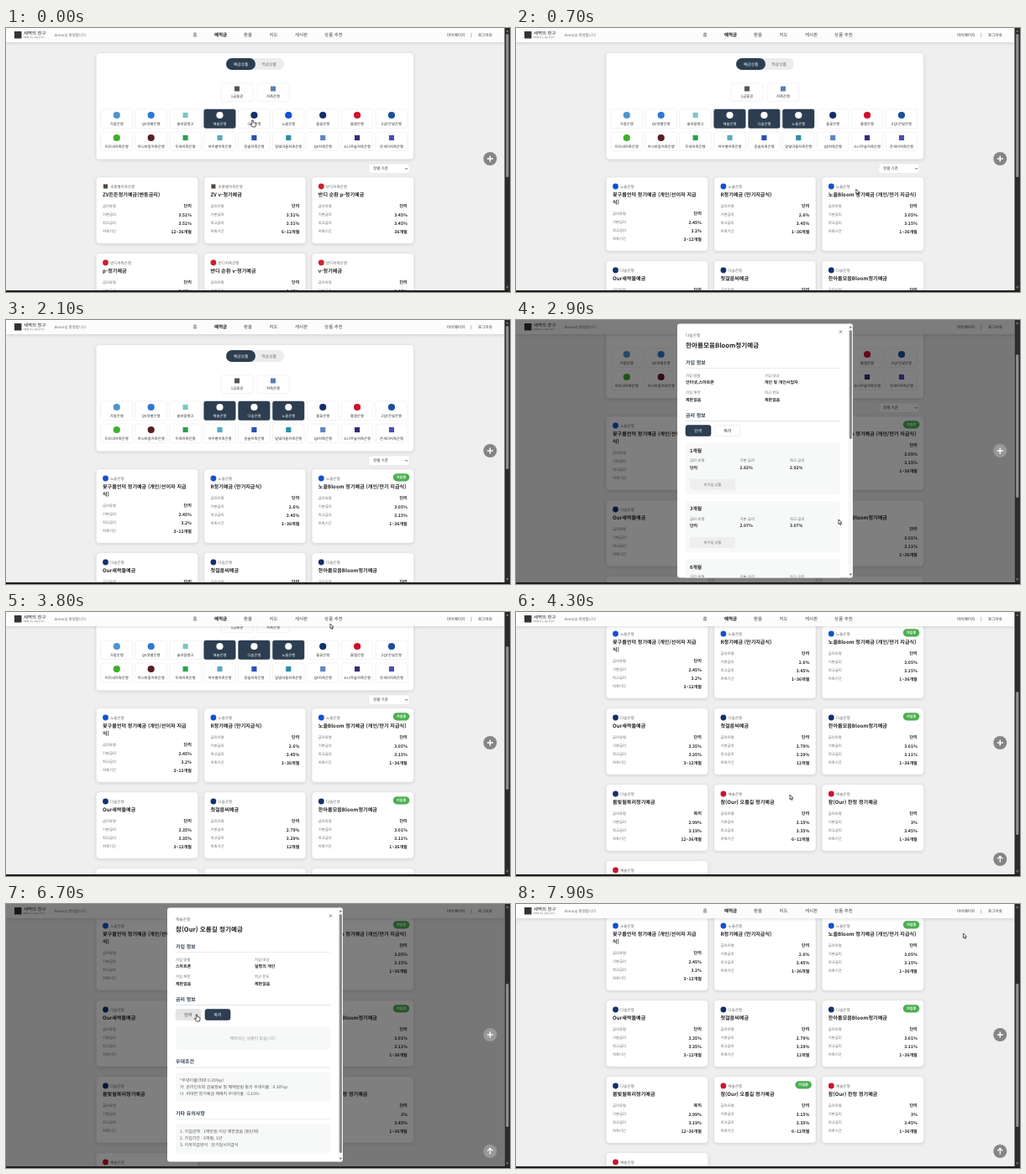
Recreate the animation shown at these times as an HTML page with a canvas. Size 600 px wide and 315 px high, loop 8 s.

```html
<!DOCTYPE html>
<html lang="ko">
<head>
<meta charset="utf-8">
<style>
html, body { margin: 0; width: 600px; height: 315px; overflow: hidden; background: #efefef; }
canvas { display: block; width: 600px; height: 315px; }
</style>
</head>
<body>
<canvas id="stage"></canvas>
<script>
const LOOP = 8000, VIEW_W = 593.5, VIEW_H = 313;
const NAVY = '#2c3e50', INK = '#222', MUTED = '#666', GREEN = '#4caf50';
const FONT = '"Noto Sans CJK KR", "Noto Sans KR", "Noto Sans CJK JP", "Noto Sans", sans-serif';
const canvas = document.getElementById('stage');
const ctx = canvas.getContext('2d');
const dpr = window.devicePixelRatio || 1;
canvas.width = 600 * dpr;
canvas.height = 315 * dpr;

// name, logo colour, wide logo (drawn as a small square)
const BANKS = [
  ['가람은행', '#4f94cd'], ['QV샛별은행', '#2b78d4'], ['솔바람뱅크', '#7fc4c4', 1],
  ['해솔은행', '#c8152d'], ['다솜은행', '#12316b'], ['노을은행', '#1450d2'],
  ['들꽃은행', '#12306b'], ['물결은행', '#d0112b'], ['ZQT은빛은행', '#1d4f9e'],
  ['미리내저축은행', '#3fae29'], ['하늬바람저축은행', '#5a1f22'], ['두레저축은행', '#2f9e4f', 1],
  ['여우별저축은행', '#5aa9c0', 1], ['윤슬저축은행', '#2a50b8', 1], ['달빛마을저축은행', '#2a8fa8', 1],
  ['QX저축은행', '#5c86c4', 1], ['소나무숲저축은행', '#3a2a78', 1], ['온새미저축은행', '#4a4fb0', 1],
  ['초롱별저축은행', '#55463c', 1], ['반디저축은행', '#d0202e'],
];
const HAESOL = 3, DASOM = 4, NOEUL = 5, CHORONG = 18, BANDI = 19;

const card = (bank, title, base, max, term, type = '단리') => ({ bank, title, values: [type, base, max, term] });
const ALL_CARDS = [
  card(CHORONG, 'ZV든든정기예금(변동금리)', '3.51%', '3.51%', '12~36개월'),
  card(CHORONG, 'ZV v-정기예금', '3.51%', '3.51%', '6~12개월'),
  card(BANDI, '반디 순환 p-정기예금', '3.45%', '3.45%', '36개월'),
  card(BANDI, 'p-정기예금', '3.45%', '3.45%', '12~36개월'),
  card(BANDI, '반디 순환 v-정기예금', '3.45%', '3.45%', '36개월'),
  card(BANDI, 'v-정기예금', '3.45%', '3.45%', '12~36개월'),
];
const BLOOM = card(NOEUL, '노을Bloom 정기예금 (개인/만기 지급식)', '3.05%', '3.15%', '1~36개월');
const MOUM = card(DASOM, '한아름모음Bloom정기예금', '3.01%', '3.11%', '1~36개월');
const OREUM = card(HAESOL, '참(Our) 오름길 정기예금', '3.15%', '3.35%', '6~12개월');
const MY_CARDS = [
  card(NOEUL, '꽃구름언덕 정기예금 (개인/선이자 지급\n식)', '2.45%', '3.2%', '3~12개월'),
  card(NOEUL, 'R정기예금 (만기지급식)', '2.6%', '3.45%', '1~36개월'),
  BLOOM,
  card(DASOM, 'Our새싹들예금', '3.35%', '3.35%', '3~12개월'),
  card(DASOM, '첫걸음씨예금', '2.79%', '3.29%', '12개월'),
  MOUM,
  card(DASOM, '봄빛월복리정기예금', '2.99%', '3.19%', '12~36개월', '복리'),
  OREUM,
  card(HAESOL, '참(Our) 한정 정기예금', '3%', '3.45%', '1~36개월'),
  card(HAESOL, '솔잎모아 정기예금', '2.9%', '3.1%', '1~36개월'),
];

const MODALS = [
  { card: BLOOM, open: 850, joined: 1700, close: 1950, thumb: 118,
    info: ['영업점,인터넷,스마트폰', '제한없음'],
    rates: [['1개월', '2.4%', '2.5%'], ['3개월', '2.5%', '2.6%'], ['6개월', '2.6%', '2.7%']] },
  { card: MOUM, open: 2550, joined: 3500, close: 3750, thumb: 130,
    info: ['인터넷,스마트폰', '개인 및 개인사업자'],
    rates: [['1개월', '2.82%', '2.92%'], ['3개월', '2.97%', '3.07%'], ['6개월', '3.01%', '3.11%']] },
  { card: OREUM, open: 5250, joined: 7200, close: 7450, thumb: 213,
    info: ['스마트폰', '실명의 개인'], compound: [6300, 6800],
    rates: [['6개월', '2.95%', '3.15%'], ['12개월', '3.15%', '3.35%']],
    notes: [
      ['우대조건', '*우대이율(최대 0.20%p)', '가. 온라인조회 금융정보 및 혜택알림 동의 우대이율 : 0.10%p', '나. 비대면 정기예금 재예치 우대이율 : 0.10%'],
      ['기타 유의사항', '1. 가입금액 : 1백만원 이상 제한없음 (원단위)', '2. 가입기간 : 6개월, 1년', '3. 이자지급방식 : 만기일시지급식'],
    ] },
];

// time, x, y, hand cursor from here on
const POINTER = [
  [0, 293.5, 110, 1], [100, 293.5, 110, 1], [380, 334, 110, 1], [520, 334, 112, 0], [780, 425, 215, 0],
  [900, 425, 215, 0], [1250, 239, 195, 1], [1700, 239, 195, 0], [1900, 386, 14, 0], [2060, 386, -15, 0],
  [2200, 400, -15, 0], [2400, 425, 240, 0], [2600, 425, 240, 0], [2900, 384, 238, 0], [3250, 236, 196, 1],
  [3500, 236, 196, 0], [3700, 386, 14, 0], [3800, 386, 14, 0], [4250, 326, 218, 0], [4400, 326, 218, 0],
  [5000, 300, 240, 0], [5850, 300, 240, 0], [6200, 252, 132, 1], [6380, 252, 132, 1], [6650, 227, 132, 1],
  [6800, 227, 132, 1], [7050, 236, 196, 1], [7220, 236, 196, 0], [7400, 386, 14, 0], [7480, 386, 14, 0],
  [7880, 532.5, 35, 0], [LOOP, 532.5, 35, 0],
];
const SCROLL = [[0, 0], [2200, 0], [2450, 63], [3850, 63], [4150, 163], [LOOP, 163]];

function track(keys, t) {
  const i = Math.max(1, keys.findIndex(k => k[0] > t));
  const a = keys[i - 1], b = keys[i];
  const u = (t - a[0]) / (b[0] - a[0]), e = u * u * (3 - 2 * u);
  return a.map((v, j) => v + (b[j] - v) * e).concat(a[3]);
}

function text(str, x, y, size, color = INK, weight = 400, align = 'left') {
  ctx.save();
  ctx.translate(x, y);
  ctx.scale(.1, .1);
  ctx.font = `${weight} ${size * 10}px ${FONT}`;
  ctx.textRendering = 'geometricPrecision';
  ctx.textBaseline = 'middle';
  ctx.textAlign = align;
  ctx.fillStyle = color;
  ctx.fillText(str, 0, 0);
  ctx.restore();
}

function box(x, y, w, h, r, fill, stroke, shadow) {
  ctx.save();
  ctx.beginPath();
  ctx.roundRect(x, y, w, h, r);
  if (shadow) {
    ctx.shadowColor = 'rgba(0,0,0,.14)';
    ctx.shadowBlur = 4 * dpr;
    ctx.shadowOffsetY = dpr;
  }
  ctx.fillStyle = fill;
  ctx.fill();
  ctx.shadowColor = 'transparent';
  if (stroke) { ctx.strokeStyle = stroke; ctx.lineWidth = .5; ctx.stroke(); }
  ctx.restore();
}

function disc(x, y, r, fill) {
  ctx.beginPath();
  ctx.arc(x, y, r, 0, 7);
  ctx.fillStyle = fill;
  ctx.fill();
}

function poly(points, fill, stroke, width = .6) {
  ctx.beginPath();
  points.forEach(([x, y]) => ctx.lineTo(x, y));
  if (fill) { ctx.closePath(); ctx.fillStyle = fill; ctx.fill(); }
  if (stroke) { ctx.strokeStyle = stroke; ctx.lineWidth = width; ctx.stroke(); }
}

function logo(bank, x, y, r, color = BANKS[bank][1]) {
  if (BANKS[bank][2]) box(x - r * .75, y - r * .75, r * 1.5, r * 1.5, 0, color);
  else disc(x, y, r, color);
}

function drawFilters(selected) {
  box(107.5, 30, 377.5, 126.5, 4, '#fff', null, true);
  box(262, 36, 69, 14, 7, '#ececec');
  box(262, 36, 35, 14, 7, NAVY);
  text('예금상품', 279.5, 43, 4.8, '#fff', 500, 'center');
  text('적금상품', 313, 43, 4.8, MUTED, 400, 'center');
  [['1금융권', 275, '#555'], ['저축은행', 318, '#5c7fb0']].forEach(([name, x, color]) => {
    box(x - 19, 66, 38, 21.5, 2, '#fff', '#e6e6e6');
    box(x - 3, 69.5, 6, 6, 0, color);
    text(name, x, 81.5, 4.4, '#333', 400, 'center');
  });
  BANKS.slice(0, 18).forEach(([name], i) => {
    const x = 113 + i % 9 * 40.9, y = i < 9 ? 97 : 124, on = selected.includes(i);
    box(x, y, 37.5, 22.5, 2, on ? NAVY : '#fff', on ? NAVY : '#e6e6e6');
    logo(i, x + 18.8, y + 7, 4.1, on ? '#fff' : undefined);
    text(name, x + 18.8, y + 17, 4.35, on ? '#fff' : '#333', 500, 'center');
  });
  box(432, 162, 48, 11.5, 2, '#fff', '#ddd');
  text('정렬 기준', 437, 167.7, 4.5, '#333');
  poly([[475.2, 167], [476.7, 168.5], [478.2, 167]], null, INK, .7);
}

function drawCard(c, x, y, h, joined) {
  box(x, y, 121, h, 4, '#fff', '#e8e8e8', true);
  logo(c.bank, x + 11, y + 11, 3.4);
  text(BANKS[c.bank][0], x + 16.7, y + 11, 4.5, MUTED);
  const lines = c.title.split('\n');
  lines.forEach((line, i) => text(line, x + 7.5, y + 21 + i * 9, 6.1, INK, 700));
  const top = y + 34.5 + (lines.length - 1) * 9;
  ['금리유형', '기본금리', '최고금리', '저축기간'].forEach((label, i) => {
    text(label, x + 7.5, top + i * 10.1, 4.35, MUTED);
    text(c.values[i], x + 113.5, top + i * 10.1, 5.1, INK, 700, 'right');
  });
  if (joined) {
    box(x + 96.5, y + 5.2, 19.5, 9.2, 4.6, GREEN);
    text('가입중', x + 106.2, y + 9.8, 4.2, '#fff', 700, 'center');
  }
}

function drawCards(cards, t) {
  let y = 178;
  for (let i = 0; i < cards.length; i += 3) {
    const row = cards.slice(i, i + 3);
    const h = row.some(c => c.title.includes('\n')) ? 88 : 79;
    row.forEach((c, j) => drawCard(c, 107.5 + j * 128.4, y, h, MODALS.some(m => m.card === c && t >= m.joined)));
    y += h + 12;
  }
}

function drawHeader() {
  box(0, 0, VIEW_W, 17, 0, '#fcfcfc', null, true);
  box(10, 4, 8.5, 8.5, 0, '#333');
  text('새벽의 창구', 21, 6.3, 5.4, INK, 500);
  text('하루를 여는 금융 도우미', 20.5, 11, 2.5, MUTED);
  text('demo님 환영합니다', 57.5, 8.5, 4.4, MUTED);
  [['홈', 225], ['예적금', 255.5], ['환율', 288], ['지도', 318.5], ['게시판', 351.5], ['상품 추천', 390]]
    .forEach(([name, x], i) => text(name, x, 8.3, 5.5, i === 1 ? '#111' : '#444', i === 1 ? 700 : 400, 'center'));
  text('마이페이지', 525, 8.5, 4.6, '#333');
  text('|', 554, 8.3, 5, '#333', 400, 'center');
  text('로그아웃', 562, 8.5, 4.6, '#333');
}

function drawModal(m, t, hover) {
  const compound = m.compound && t >= m.compound[0] && t < m.compound[1];
  ctx.fillStyle = 'rgba(0,0,0,.5)';
  ctx.fillRect(0, 0, VIEW_W, VIEW_H);
  ctx.save();
  ctx.beginPath();
  ctx.roundRect(192, 4.5, 209, 303, 3);
  ctx.clip();
  ctx.fillStyle = '#fff';
  ctx.fillRect(192, 4, 209, 304);

  const heading = (str, y) => {
    text(str, 202, y, 6, NAVY, 700);
    box(202, y + 6.6, 184, .6, 0, '#d5dae0');
  };
  const field = (label, value, x, y) => {
    text(label, x, y, 4.4, MUTED);
    text(value, x, y + 8.4, 5, INK, 700);
  };
  const tab = (str, x, on) => {
    const fill = on ? NAVY : hover(x, 125.5, 30, 13) ? '#e4e4e4' : '#fff';
    box(x, 125.5, 30, 13, 2.5, fill, on ? '#1d2b3a' : '#ddd');
    text(str, x + 15, 132.2, 5.1, on ? '#fff' : '#333', 500, 'center');
  };

  text(BANKS[m.card.bank][0], 202, 18.3, 4.7, MUTED);
  text(m.card.title, 202, 30.3, 7.6, INK, 700);
  poly([[385, 12.5], [388, 15.5]], null, '#333');
  poly([[388, 12.5], [385, 15.5]], null, '#333');
  heading('가입 정보', 50.3);
  field('가입 방법', m.info[0], 202, 66);
  field('가입 대상', m.info[1], 296, 66);
  field('가입 제한', '제한없음', 202, 86.5);
  field('최고 한도', '제한없음', 296, 86.5);
  heading('금리 정보', 113.5);
  tab('단리', 202, !compound);
  tab('복리', 237, compound);

  let y = 146.7;
  if (compound) {
    box(202, y, 184, 27, 3, '#f7f8f8');
    text('해당되는 상품이 없습니다.', 294, 160.2, 5, '#999', 400, 'center');
    y += 27;
  } else {
    m.rates.forEach(([term, base, max], i) => {
      const top = y + i * 69.3, joined = i === 0 && t >= m.joined;
      box(202, top, 184, 61.3, 3, '#f7f8f8');
      text(term, 207, top + 9, 5.8, INK, 700);
      field('금리 유형', '단리', 207, top + 21);
      field('기본 금리', base, 266.5, top + 21);
      field('최고 금리', max, 326, top + 21);
      box(207, top + 43, 54, 13, 2.5, joined ? GREEN : hover(207, top + 43, 54, 13) ? '#dcdcdc' : '#eee');
      text(joined ? '가입 상품' : '미가입 상품', 234, top + 49.6, 4.2, joined ? '#fff' : MUTED, 400, 'center');
    });
    y += m.rates.length * 69.3 - 8;
  }
  (m.notes || []).forEach(([title, ...lines], i) => {
    const top = y + 14.5 + i * 61.4;
    heading(title, top);
    box(202, top + 12.8, 184, 35, 3, '#f7f8f8');
    lines.forEach((line, j) => text(line, 207, top + 21.5 + j * 8.2, 5, '#555'));
  });

  box(395.5, 4, 6, 304, 0, '#f7f7f7');
  box(396.8, 12, 3.2, compound ? 285 : m.thumb, 1.6, '#8b8b8b');
  poly([[396.8, 9.5], [398.4, 7.3], [400, 9.5]], '#666');
  poly([[396.8, 302.7], [398.4, 305], [400, 302.7]], '#666');
  ctx.restore();
}

function drawPointer(x, y, hand) {
  ctx.save();
  ctx.translate(x, y);
  ctx.lineJoin = 'round';
  const shape = hand
    ? [[-.7, 0], [.7, 0], [.8, 2.6], [3.8, 3.3], [4, 5.5], [3.2, 8], [-.4, 8], [-2.7, 4.8], [-2, 4.2], [-.7, 5.2], [-.7, 0]]
    : [[0, 0], [0, 5.6], [1.3, 4.5], [2.2, 6.5], [3.1, 6.1], [2.3, 4.1], [4, 4], [0, 0]];
  poly(shape, '#fff', '#111', .7);
  ctx.restore();
}

function draw(t) {
  const [, scroll] = track(SCROLL, t);
  const [, px, py, , hand] = track(POINTER, t);
  const hover = (x, y, w, h) => px >= x && px <= x + w && py >= y && py <= y + h;
  const selected = [HAESOL, ...(t >= 100 ? [DASOM] : []), ...(t >= 400 ? [NOEUL] : [])];
  const cards = t < 100 ? ALL_CARDS : MY_CARDS.slice(t < 200 ? 7 : t < 500 ? 3 : 0);
  const modal = MODALS.find(m => t >= m.open && t < m.close);

  ctx.setTransform(dpr, 0, 0, dpr, 0, 0);
  ctx.fillStyle = '#efefef';
  ctx.fillRect(0, 0, 600, 315);
  ctx.save();
  ctx.translate(0, -scroll);
  drawFilters(selected);
  drawCards(cards, t);
  ctx.restore();
  drawHeader();
  if (modal) drawModal(modal, t, hover);

  const fab = modal ? '#989898' : '#858585';
  disc(576.3, 156, 8, fab);
  poly([[572.8, 156], [579.8, 156]], null, '#fff', 1.5);
  poly([[576.3, 152.5], [576.3, 159.5]], null, '#fff', 1.5);
  if (scroll > 100) {
    disc(576.3, 295, 8, fab);
    poly([[573.2, 294.6], [576.3, 291.5], [579.4, 294.6]], null, '#fff', 1.3);
    poly([[576.3, 291.8], [576.3, 298.8]], null, '#fff', 1.3);
  }

  box(VIEW_W, 0, 6.5, 315, 0, '#2c2c2c');
  box(0, VIEW_H, 600, 2, 0, '#1e1e1e');
  box(595.2, 7 + scroll * .54, 3.2, 171, 1.6, '#929292');
  poly([[595.2, 4.6], [596.8, 2.4], [598.4, 4.6]], '#929292');
  poly([[595.2, 308.4], [596.8, 310.6], [598.4, 308.4]], '#929292');
  drawPointer(px, py, hand);
}

function loop(now) {
  draw(now % LOOP);
  requestAnimationFrame(loop);
}
requestAnimationFrame(loop);
</script>
</body>
</html>
```
